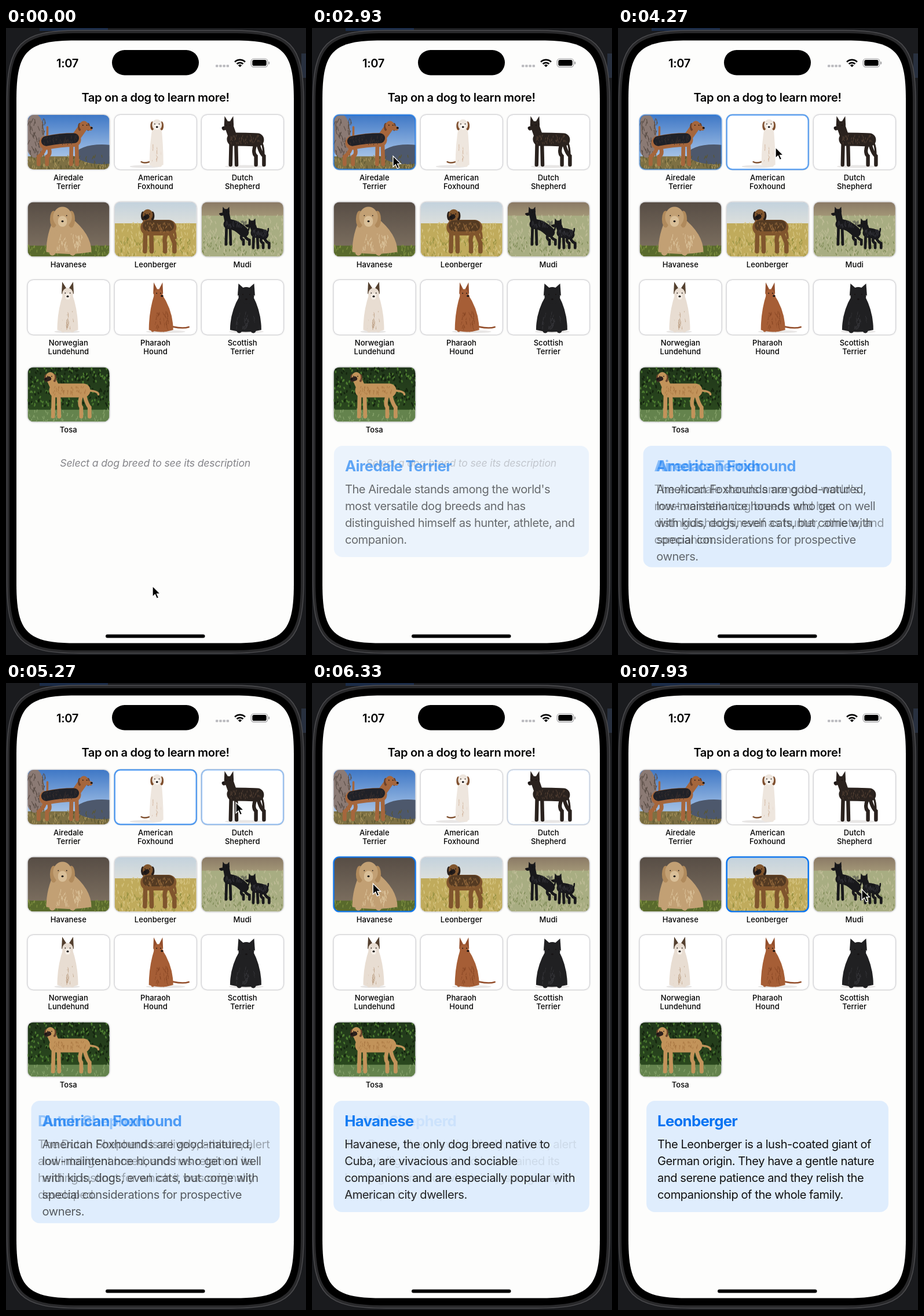
These frames come from a looping animation (518 px wide and 1082 px high, 8 s). An HTML page:

```html
<!DOCTYPE html>
<html lang="en">
<head>
<meta charset="utf-8">
<title>Dog breeds</title>
<style>
html, body { margin: 0; width: 100%; height: 100%; overflow: hidden; background: #1a1b1e; }
svg { display: block; width: 518px; height: 1082px; }
text { font-family: Inter, "Liberation Sans", sans-serif; font-optical-sizing: none; white-space: pre; }
.mid { text-anchor: middle; }
.head { font-size: 20.1px; font-weight: 600; letter-spacing: -.34px; }
.label { font-size: 13px; font-weight: 500; letter-spacing: .05px; }
.hint { font-size: 17.7px; font-style: italic; letter-spacing: -.2px; fill: #85858a; }
.name { font-size: 25.8px; font-weight: 700; letter-spacing: -.75px; fill: #0573f2; }
.body { font-size: 20.1px; letter-spacing: -.46px; fill: #111; }
.card { filter: drop-shadow(0 0 1.8px #484858a0); }
</style>
</head>
<body>
<svg id="stage" viewBox="0 0 518 1082"></svg>
<script>
const LOOP = 8000, FADE = 300, TRAVEL = 600, CENTER = 258;
const CARD_W = 141, CARD_H = 94, PAD = 19;

let seed = 7;
const rand = () => (seed = seed * 16807 % 2147483647) / 2147483647;
const mix = (a, b, p) => a + (b - a) * p;
const smooth = u => (u = Math.min(1, Math.max(0, u)), u * u * (3 - 2 * u));

const shape = (fill, d) => `<path fill="${fill}" d="${d}"/>`;
const rect = (x, y, w, h, fill, r = 0, more = '') =>
  `<rect x="${x}" y="${y}" width="${w}" height="${h}" rx="${r}" fill="${fill}" ${more}/>`;
const oval = (x, y, rx, ry, fill) => `<ellipse cx="${x}" cy="${y}" rx="${rx}" ry="${ry}" fill="${fill}"/>`;
const line = (color, width, d, cap = 'round') =>
  `<path d="${d}" fill="none" stroke="${color}" stroke-width="${width}" stroke-linecap="${cap}"/>`;
const text = (cls, x, y, s) => `<text class="${cls}" x="${x}" y="${y}">${s}</text>`;

// Rectangle whose corners curve in gradually
function softRect(x, y, w, h, r, fill, more = '') {
  const e = 1.528 * r, c = .272 * r, X = x + w, Y = y + h;
  return `<path fill="${fill}" ${more} d="M${x + e} ${y}H${X - e}C${X - c} ${y} ${X} ${y + c} ${X} ${y + e}V${Y - e}` +
    `C${X} ${Y - c} ${X - c} ${Y} ${X - e} ${Y}H${x + e}C${x + c} ${Y} ${x} ${Y - c} ${x} ${Y - e}V${y + e}` +
    `C${x} ${y + c} ${x + c} ${y} ${x + e} ${y}Z"/>`;
}

// Random short strokes: grass, leaves or hair
function tufts(color, n, x, y, w, h, len = 5, width = 1.2) {
  let d = '';
  for (let i = 0; i < n; i++)
    d += `M${(x + rand() * w).toFixed(1)} ${(y + rand() * h).toFixed(1)}l${((rand() - .5) * len).toFixed(1)} ${len}`;
  return line(color, width, d);
}

let scenes = 0;
function scene(horizon, top, low, grass, blade) {
  const id = 'sky' + scenes++, y = CARD_H * horizon, h = CARD_H - y;
  return `<linearGradient id="${id}" x2="0" y2="1"><stop stop-color="${top}"/>` +
    `<stop offset="1" stop-color="${low}"/></linearGradient>` +
    rect(0, 0, CARD_W, y + 1, `url(#${id})`) + rect(0, y, CARD_W, h, grass) +
    tufts(blade, h * 3, 0, y - 2, CARD_W, h, 4);
}

// ears > 0 stand up by that height, otherwise they hang; face is where the snout points
function headOf({ fur, ear = fur, muzzle = fur, head: [x, y], r, ears = 0, face = 0 }) {
  const pair = f => f(-1) + f(1), nx = x + face * r * 1.3;
  const earAt = s => ears
    ? shape(ear, `M${x} ${y - r * .6}L${x + s * r * .9} ${y - ears}L${x + s * r} ${y}Z`)
    : oval(x + s * r * .85, y + r * .2, r * .35, r * .8, ear);
  return pair(earAt) + oval(x, y, r * .9, r, fur) +
    line(muzzle, r * .85, `M${x + face * r * .4} ${y + r * .3}L${nx} ${y + r * .5}`) +
    pair(s => oval(x + s * r * .4 + face * r * .2, y - r * .15, .9, .9, '#17110f')) +
    oval(nx + face * 2, y + r * .4, 2, 1.6, '#161314');
}

function stand(dog) {
  const { fur, back = fur, hair, chest: [cx, cy], rump: [rx, ry], tail: [tx, ty], head: [hx, hy],
    girth, face, ground = 85 } = dog;
  const legs = [-1, 1].map(s => {
    const fx = cx + s * girth * .18, bx = rx + s * girth * .3, knee = bx - face * girth * .25;
    return line(fur, girth * .28, `M${fx} ${cy}L${fx + s} ${ground}`) +
      line(fur, girth * .28, `M${rx} ${ry}Q${bx + face * 4} ${mix(ry, ground, .5)} ${knee} ${mix(ry, ground, .65)}L${knee} ${ground}`);
  }).join('');
  const spine = `M${cx} ${cy}Q${(cx + rx) / 2} ${Math.min(cy, ry)} ${rx} ${ry}`;
  return line(fur, girth * .15, `M${rx} ${ry}Q${tx} ${ry} ${tx} ${ty}`) + legs + line(fur, girth, spine) +
    line(fur, girth * .65, `M${cx} ${cy}L${hx} ${hy}`) +
    `<g transform="translate(0 ${-girth * .12})">${line(back, girth * .72, spine)}</g>` +
    tufts(hair, 45, Math.min(cx, rx) - 5, cy - girth * .35, Math.abs(rx - cx) + 10, girth * .6, 3, .8) +
    headOf({ r: girth * .36, ...dog });
}

function sit(dog) {
  const { fur, hair, head: [hx, hy], r, base, half, tail, ground = 89 } = dog;
  const mid = mix(hy, ground, .45), n = r * .75, feet = half * .45;
  return (tail ? line(dog.ear, 2.6, `M${base} ${ground - 14}Q${mix(base, tail, .7)} ${ground - 3} ${tail} ${ground - 8}`) : '') +
    shape(fur, `M${hx - n} ${hy}Q${base - half} ${mid} ${base - half} ${ground - 3}Q${base} ${ground + 4} ${base + half} ${ground - 3}` +
      `Q${base + half} ${mid} ${hx + n} ${hy}Z`) +
    tufts(hair, half * 2, base - half * .6, mid, half * 1.2, ground - mid - 8, 5, .8) +
    [-1, 1].map(s => line(fur, r * .6, `M${hx + s * feet / 2} ${mid}L${hx + s * feet} ${ground - 2}`)).join('') + headOf(dog);
}

const floor = (x, w) => oval(x, 89, w, 2.5, '#e8e6e5');
const black = { fur: '#18181b', hair: '#34343a', face: -1, ears: 10, girth: 17 };

const photos = [
  ['Airedale Terrier', () =>
    scene(.76, '#3f78c6', '#a5c2e6', '#7d7043', '#a9955c') + oval(128, 68, 45, 17, '#4d586c') +
    oval(12, 36, 17, 38, '#8b7a74') + tufts('#5d5049', 45, 0, 6, 30, 60, 7) + tufts('#5a5630', 60, 0, 68, 141, 24, 4) +
    stand({ fur: '#a5663c', back: '#202127', ear: '#6b4029', hair: '#3b3230', head: [97, 19], chest: [80, 43],
      rump: [32, 48], tail: [34, 21], girth: 24, face: 1 })],
  ['American Foxhound', () => floor(52, 26) +
    sit({ fur: '#eee6de', ear: '#80502f', hair: '#c9a88c', muzzle: '#faf5f0', head: [73, 17], r: 9.5, base: 72, half: 12, tail: 46 })],
  ['Dutch Shepherd', () => floor(74, 34) +
    stand({ fur: '#2a221e', hair: '#5c4738', head: [47, 19], chest: [55, 42], rump: [96, 43], tail: [107, 70],
      girth: 23, ears: 17, face: -.8, ground: 86 })],
  ['Havanese', () =>
    scene(.8, '#574d45', '#7a6d5e', '#596a2c', '#7f9040') +
    sit({ fur: '#c2a074', ear: '#b08a5c', hair: '#e0c9a3', muzzle: '#d9bf98', head: [60, 26], r: 18, base: 71, half: 39 })],
  ['Leonberger', () =>
    scene(.39, '#c3d2dd', '#dcdfdc', '#c0ab5c', '#d6c583') + tufts('#959040', 90, 0, 60, 141, 34, 4) +
    stand({ fur: '#80552d', back: '#543a22', ear: '#2a201b', muzzle: '#221b19', hair: '#a67643', head: [57, 22],
      chest: [58, 44], rump: [93, 44], tail: [105, 62], girth: 27, face: -.3 })],
  ['Mudi', () =>
    scene(.25, '#8a7965', '#a39777', '#a8ad82', '#c0bd98') + tufts('#78854f', 80, 0, 60, 141, 30, 3) +
    stand({ ...black, head: [42, 18], chest: [46, 38], rump: [73, 52], tail: [82, 42], ground: 73 }) +
    stand({ ...black, head: [87, 38], chest: [93, 53], rump: [107, 56], tail: [115, 46], ground: 79 })],
  ['Norwegian Lundehund', () => floor(68, 22) +
    sit({ fur: '#e8ddd2', ear: '#54402f', hair: '#b8997c', muzzle: '#f5eee6', head: [69, 24], r: 10.5, ears: 21, base: 69, half: 18 })],
  ['Pharaoh Hound', () => floor(88, 34) +
    sit({ fur: '#a65e36', ear: '#944f2c', hair: '#864523', head: [75, 24], r: 8.5, ears: 20, face: .5, base: 80, half: 21, tail: 128 })],
  ['Scottish Terrier', () => floor(77, 30) +
    sit({ fur: '#202022', hair: '#3c3c40', head: [77, 27], r: 15, ears: 21, base: 76, half: 27 })],
  ['Tosa', () =>
    scene(.78, '#20361a', '#2a481e', '#64834d', '#86a26b') + tufts('#4b7a2f', 130, 0, 0, 141, 66, 2, 2.4) +
    tufts('#14240f', 130, 0, 0, 141, 66, 2, 2.4) +
    stand({ fur: '#c2935a', ear: '#6a442c', muzzle: '#2d211c', hair: '#a5733f', head: [39, 17], chest: [49, 40],
      rump: [96, 40], tail: [122, 47], girth: 24, face: -.6 })]
];

// Each tap: time, card, pointer position and description
const taps = [
  { at: 2760, card: 0, x: 140, y: 221, lines: ["The Airedale stands among the world's", 'most versatile dog breeds and has', 'distinguished himself as hunter, athlete, and', 'companion.'] },
  { at: 4100, card: 1, x: 272, y: 206, lines: ['American Foxhounds are good-natured,', 'low-maintenance hounds who get on well', 'with kids, dogs, even cats, but come with', 'special considerations for prospective', 'owners.'] },
  { at: 5155, card: 2, x: 397, y: 206, lines: ['The Dutch Shepherd is a lively, athletic, alert', 'and intelligent breed, and has retained its', 'herding instinct for which it was originally', 'developed.'] },
  { at: 6084, card: 3, x: 102, y: 346, lines: ['Havanese, the only dog breed native to', 'Cuba, are vivacious and sociable', 'companions and are especially popular with', 'American city dwellers.'] },
  { at: 7030, card: 4, x: 264, y: 350, lines: ['The Leonberger is a lush-coated giant of', 'German origin. They have a gentle nature', 'and serene patience and they relish the', 'companionship of the whole family.'] }
];
const moves = [{ at: 1900, x: 228, y: 311 }, ...taps, { at: LOOP, x: 421, y: 356 }];
const heightOf = tap => 76 + 29 * tap.lines.length;

// Lay the cards out in threes; two-line labels make a row taller
let rowTop = 150;
const cards = photos.map(([name, draw], i) => {
  const x = 37.5 + i % 3 * 150.2, y = rowTop, words = name.split(' ');
  if (i % 3 == 2) rowTop += words.length > 1 ? 150.4 : 134.6;
  return `<g class="card">${rect(x, y, CARD_W, CARD_H, '#fff', 9.7)}</g>` +
    `<g transform="translate(${x} ${y})"><g clip-path="url(#round)">${draw()}</g></g>` +
    words.map((w, k) => text('label mid', x + 70.3, y + 112.6 + k * 15.7, w)).join('') +
    rect(x, y, CARD_W, CARD_H, 'none', 9.7, 'class="ring" stroke="#0573f2" stroke-width="2.4" opacity="0"');
}).join('').replace(/class="label mid" x="([\d.]+)" y="412/g, 'class="label mid" x="$1" y="412');

const phone = rect(58, 0, 118, 5, '#1b2c48') + rect(510, 44, 8, 42, '#28303f') +
  softRect(1.5, 4, 512.5, 1075, 82, '#29292b', 'stroke="#4d4d50" stroke-width="1.4"') +
  softRect(6, 9, 503, 1065, 78, '#000') + softRect(18, 21.5, 479, 1040, 67, '#fdfdfc') +
  rect(183, 38, 150, 43.5, '#000', 21.75) + rect(172, 1046.5, 171.5, 6, '#000', 3);

const wifi = [[12.6, 2.7], [7.7, 2.7], [2.2, 4.4]].map(([r, w]) => {
  const d = r * Math.SQRT1_2, y = 67.5 - d;
  return line('#000', w, `M${404 - d} ${y}A${r} ${r} 0 0 1 ${404 + d} ${y}`, 'butt');
}).join('');
const dots = [0, 1, 2, 3].map(i => rect(362 + i * 6.2, 63.5, 4.4, 4, '#b9b9bd', 1)).join('');
const battery = rect(423.2, 53, 28.6, 14.4, 'none', 4.6, 'stroke="#9a9a9d" stroke-width="1.2"') +
  rect(425.3, 55.1, 24.4, 10.2, '#000', 2.8) + rect(453.3, 58, 1.8, 4.6, '#9a9a9d', .9);

const describe = tap => `<g class="words" opacity="0">${text('name', 0, 765, photos[tap.card][0])}` +
  tap.lines.map((s, i) => text('body', 0, 803 + 29 * i, s)).join('') + '</g>';

const stage = document.getElementById('stage');
stage.innerHTML = `<clipPath id="round">${rect(0, 0, CARD_W, CARD_H, '#000', 9.7)}</clipPath>` + phone +
  text('head', 87, 67.5, '1:07') + dots + wifi + battery +
  text('head mid', CENTER, 126.5, 'Tap on a dog to learn more!') + cards +
  rect(38, 721, 440, 192, '#dfedfd', 14.6, 'id="panel"') +
  `<g id="hint">${text('hint mid', 257.7, 757, 'Select a dog breed to see its description')}</g>` +
  taps.map(describe).join('') +
  '<path id="pointer" d="M0 0V18.5L4.3 14.6 7.3 21.5 10.5 20.1 7.5 13.4H13.3Z" stroke="#fff" stroke-width="1.3"/>';

const panel = document.getElementById('panel');
const hint = document.getElementById('hint');
const pointer = document.getElementById('pointer');
const rings = stage.querySelectorAll('.ring');
const words = stage.querySelectorAll('.words');
const set = (el, attrs) => { for (const k in attrs) el.setAttribute(k, attrs[k]); };

// The panel hugs its longest line
taps.forEach((tap, i) => {
  const widths = [...words[i].querySelectorAll('.body')].map(el => el.getComputedTextLength());
  tap.half = Math.max(...widths) / 2 + 21.8;
});

function render(t) {
  const shown = taps.map(tap => smooth((t - tap.at) / FADE));
  const cur = Math.max(0, shown.filter(s => s > 0).length - 1);
  const now = taps[cur], old = taps[cur - 1] || now, p = shown[cur];

  const half = mix(old.half, now.half, p), left = CENTER - half;
  set(panel, { x: left, width: half * 2, height: mix(heightOf(old), heightOf(now), p), opacity: shown[0] });
  set(hint, { opacity: 1 - shown[0] });

  // New words fade in at their final place; old ones follow the panel out
  taps.forEach((tap, i) => {
    const opacity = shown[i] * (1 - (shown[i + 1] || 0));
    const x = (i < cur ? left : CENTER - tap.half) + PAD;
    set(words[i], { opacity, transform: `translate(${x} 0)` });
    set(rings[tap.card], { opacity });
  });

  // The pointer arrives a little before each tap
  let x = 253, y = 963;
  for (const move of moves) {
    const u = smooth((t - move.at + 150 + TRAVEL) / TRAVEL);
    x = mix(x, move.x, u);
    y = mix(y, move.y, u);
  }
  set(pointer, { transform: `translate(${x} ${y})` });
}

function tick() {
  render(performance.now() % LOOP);
  requestAnimationFrame(tick);
}
tick();
</script>
</body>
</html>
```
